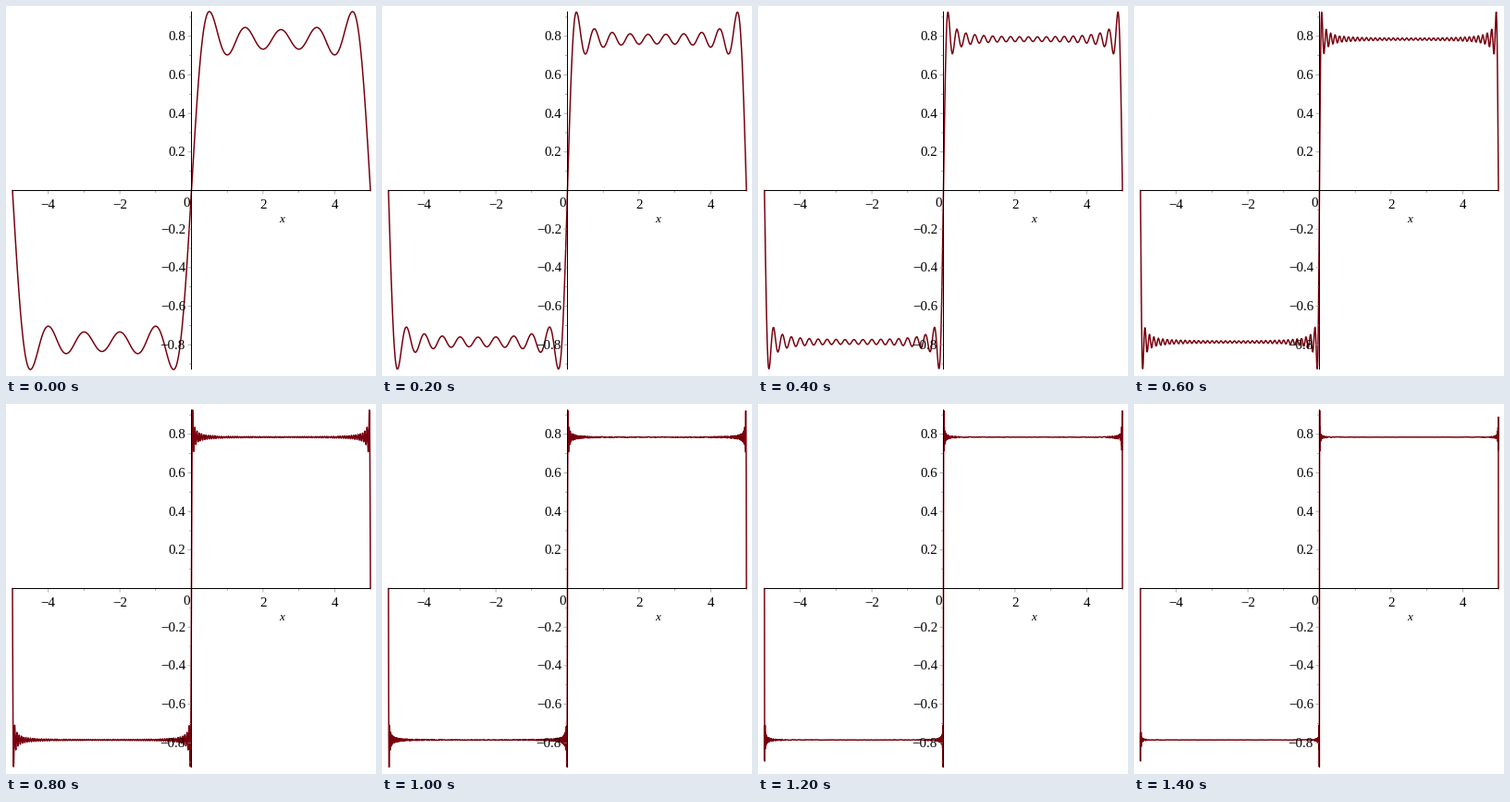
Write a matplotlib script that moves like this. It is 400 px wide and 400 px high and loops after 1600 ms.

```python
import numpy as np
import matplotlib.pyplot as plt
from matplotlib.animation import FuncAnimation

SIZE, DPI = 400, 100
PX = 72 / DPI  # points per pixel
X0, Y0 = 200.5, 199.5
X_SCALE, Y_SCALE = 38.7, 208.4
Y_MAX = 0.9286
TERMS = [5 * 2 ** k for k in range(8)]

plt.rcParams["font.family"] = "Liberation Serif"
plt.rcParams["path.simplify"] = False

fig = plt.figure(figsize=(SIZE / DPI, SIZE / DPI), dpi=DPI, facecolor="white")
ax = fig.add_axes([0, 0, 1, 1])
ax.set(xlim=(0, SIZE), ylim=(SIZE, 0))
ax.axis("off")


def to_px(x, y):
    return X0 + X_SCALE * x, Y0 - Y_SCALE * y


def square_wave(x, terms):
    """Partial Fourier sum of a square wave with period 10."""
    total = np.zeros_like(x)
    for n in range(1, 2 * terms, 2):
        total += np.sin(n * np.pi * x / 5) / n
    return total


def sample_adaptively(terms, start=500, passes=3, tolerance=0.004):
    """Refine a jittered grid only where the curve bends visibly."""
    rng = np.random.default_rng(4)
    xs = np.linspace(-5, 5, start)
    xs[1:-1] += rng.uniform(-0.3, 0.3, start - 2) * 10 / start
    ys = square_wave(xs, terms)
    for _ in range(passes):
        mid_x = (xs[1:] + xs[:-1]) / 2
        mid_y = square_wave(mid_x, terms)
        bent = np.abs(mid_y - (ys[1:] + ys[:-1]) / 2) > tolerance
        spots = np.flatnonzero(bent) + 1
        xs = np.insert(xs, spots, mid_x[bent])
        ys = np.insert(ys, spots, mid_y[bent])
    return xs, ys


def segment(xs, ys, color, width, z):
    ax.plot(xs, ys, color=color, lw=width * PX, zorder=z,
            solid_capstyle="butt", snap=False)


def label(x, y, text, size=15, **style):
    ax.text(x, y, text, fontsize=size * PX, color="black", zorder=5, **style)


def number(value):
    return f"{value:g}".replace("-", "\u2212")


def draw_axes():
    left, bottom = to_px(-5, -Y_MAX)
    right, top = to_px(5, Y_MAX)
    segment([left, right], [Y0, Y0], "black", 1, 4)
    segment([X0, X0], [top, bottom], "black", 1, 4)

    for i in range(-4, 5):
        if i == 0:
            continue
        x, _ = to_px(i, 0)
        major = i % 2 == 0
        segment([x, x], [Y0, Y0 + (4 if major else 2.5)], "#909090", 0.7, 3)
        if major:
            label(x, 219, number(i), ha="center", va="baseline")

    for i in range(-9, 10):
        if i == 0:
            continue
        _, y = to_px(0, i / 10)
        major = i % 2 == 0
        segment([X0 - (4 if major else 2.5), X0], [y, y], "#909090", 0.7, 3)
        if major:
            label(194, y + 4.6, number(i / 10), ha="right", va="baseline")

    label(195, 217, "0", ha="center", va="baseline")
    label(297.7, 234, "x", size=13, style="italic", ha="center", va="baseline")


draw_axes()
curves = [to_px(*sample_adaptively(n)) for n in TERMS]
curve, = ax.plot([], [], color="#78000e", lw=1.5 * PX, zorder=2,
                 solid_joinstyle="round", snap=False)


def update(frame):
    curve.set_data(*curves[frame])
    return curve,


anim = FuncAnimation(fig, update, frames=len(TERMS), interval=200,
                     repeat=True, repeat_delay=0)
plt.show()
```
